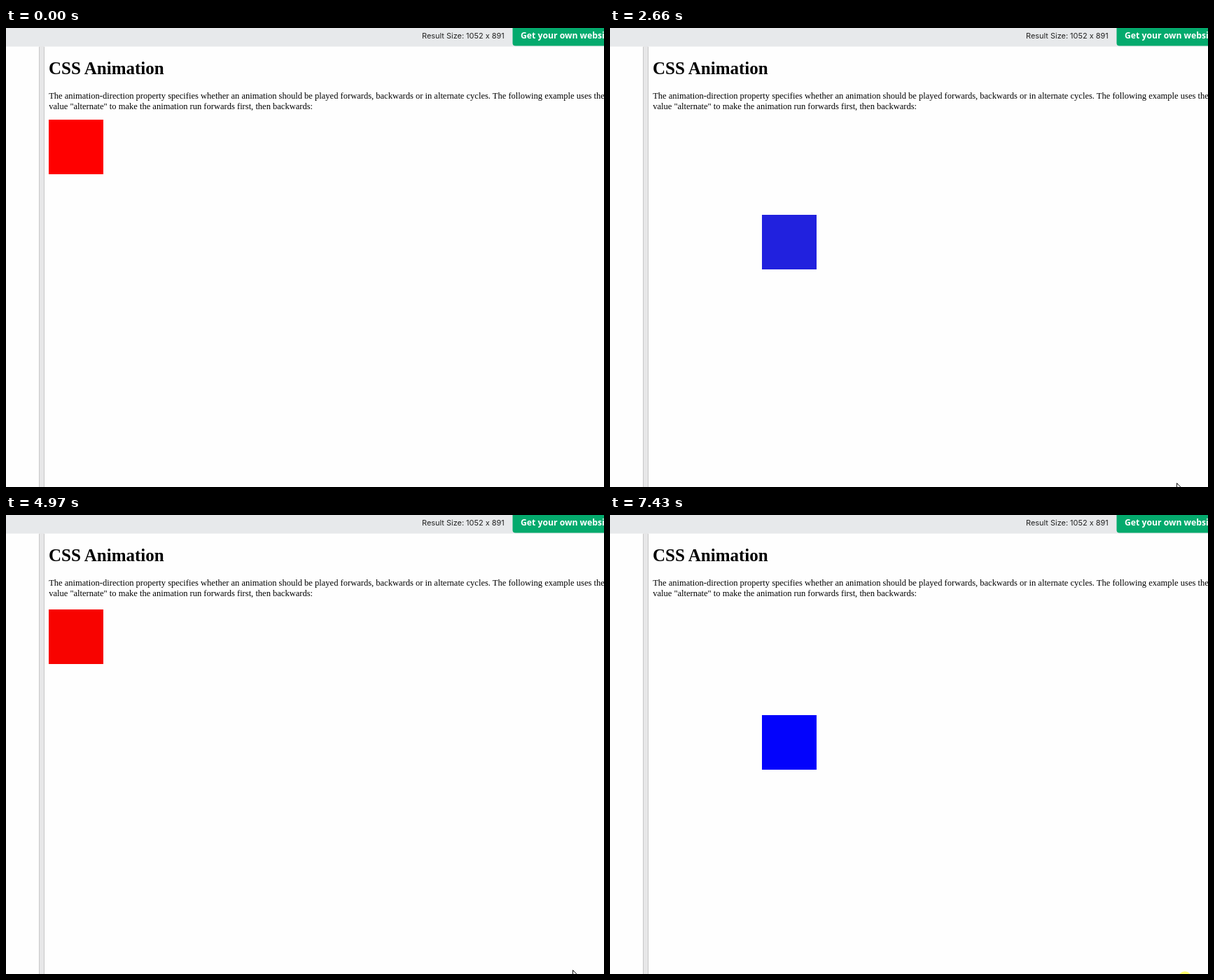
An HTML page for the animation above (7500 ms loop, 854 px wide and 656 px high).

```html
<!DOCTYPE html>
<html lang="en">
<head>
<meta charset="utf-8">
<title>CSS Animation</title>
<style>
  html, body { margin: 0; width: 100%; height: 100%; overflow: hidden; background: #fefefe; }
  svg { display: block; width: 854px; height: 656px; }
  .body { font: 12.52px "Liberation Serif", serif; }
  .title { font: bold 25px "Liberation Serif", serif; }
  .size { font: 10.95px Inter, sans-serif; fill: #222; }
  .button { font: bold 12.2px "Noto Sans", "Open Sans", sans-serif; fill: #fff; }
</style>
</head>
<body>
<svg viewBox="0 0 854 656" xmlns="http://www.w3.org/2000/svg">
  <rect width="854" height="656" fill="#fefefe"/>
  <rect width="854" height="26.5" fill="#e7e9eb"/>
  <rect x="47" y="26" width="8" height="630" fill="#e7e7e8"/>
  <path d="M47.5 27V656M54.5 27V656" stroke="#c8c8c8"/>
  <rect x="723.5" y="-10" width="150" height="35.4" rx="4" fill="#04aa6d"/>
  <text class="size" x="594" y="15">Result Size: 1052 x 891</text>
  <text class="button" x="735" y="15">Get your own website</text>
  <text class="title" x="61" y="66">CSS Animation</text>
  <text class="body" x="61.2" y="101">The animation-direction property specifies whether an animation should be played forwards, backwards or in alternate cycles. The following example uses the</text>
  <text class="body" x="61.2" y="116">value "alternate" to make the animation run forwards first, then backwards:</text>
  <rect id="box" width="78" height="78"/>
  <circle id="click" cx="821" cy="662" r="9.7" fill="#ffff6e"/>
  <path id="cursor" d="M.5 .5V13.2L3.4 10.5L5.6 15.8L7.8 14.9L5.6 9.8H9.6Z" fill="#fff" stroke="#111"/>
</svg>
<script>
const LOOP = 7500, STEP = 70;
const BEGIN = 1012, RATE = .9575 / 1000;
const LEFT = 61, TOP = 131.2, TRAVEL = 156.4;
const RED = [255, 0, 0], YELLOW = [255, 255, 0], BLUE = [0, 0, 255], GREEN = [0, 128, 0];
const COLOURS = [RED, YELLOW, BLUE, GREEN, RED];

const [box, cursor, click] = ['box', 'cursor', 'click'].map(id => document.getElementById(id));
const clamp = (v, lo, hi) => Math.min(hi, Math.max(lo, v));
const mix = (a, b, p) => a + (b - a) * p;
const show = (el, on) => el.style.display = on ? '' : 'none';

// CSS "ease": cubic-bezier(.25, .1, .25, 1)
function ease(x) {
  const bezier = (s, a, b) => 3 * a * s * (1 - s) ** 2 + 3 * b * s * s * (1 - s) + s ** 3;
  let lo = 0, hi = 1;
  for (let i = 0; i < 24; i++) {
    const s = (lo + hi) / 2;
    if (bezier(s, .25, .25) < x) lo = s; else hi = s;
  }
  return bezier(lo, .1, 1);
}

// Clockwise round a square, one side per second, then back
function drawBox(t) {
  const sec = Math.max(0, (t - BEGIN) * RATE);
  const turn = 4 - Math.abs(4 - sec);
  const side = clamp(Math.floor(turn), 0, 3);
  const p = ease(turn - side);
  const walk = side + p;
  const x = clamp(1.5 - Math.abs(walk - 1.5), 0, 1);
  const y = clamp(1.5 - Math.abs(walk - 2.5), 0, 1);
  const rgb = COLOURS[side].map((c, k) => Math.round(mix(c, COLOURS[side + 1][k], p)));
  box.setAttribute('x', Math.round(LEFT + x * TRAVEL));
  box.setAttribute('y', Math.round(TOP + y * TRAVEL));
  box.setAttribute('fill', `rgb(${rgb})`);
}

// The pointer is glimpsed twice, then rests at the bottom edge and drifts a little
function pointer(t) {
  if (t >= 70 && t < 120) return [575, 562];
  if (t >= 1680 && t < 1760) return [538, 404];
  if (t >= 2450 && t < 6160) {
    const arrive = clamp((t - 2450) / 140, 0, 1);
    const drift = clamp((t - 5740) / 140, 0, 1);
    return [mix(798, 809, arrive) - 9 * drift, mix(624, 650, arrive) - 7 * drift];
  }
}

function draw(t) {
  const held = Math.floor(t / STEP) * STEP;
  drawBox(held);
  const at = pointer(t);
  show(cursor, at);
  if (at) cursor.setAttribute('transform', `translate(${at.map(Math.round)})`);
  show(click, held >= LOOP - 2 * STEP);
}

const start = performance.now();
function tick() {
  draw((performance.now() - start) % LOOP);
  requestAnimationFrame(tick);
}
tick();
</script>
</body>
</html>
```
